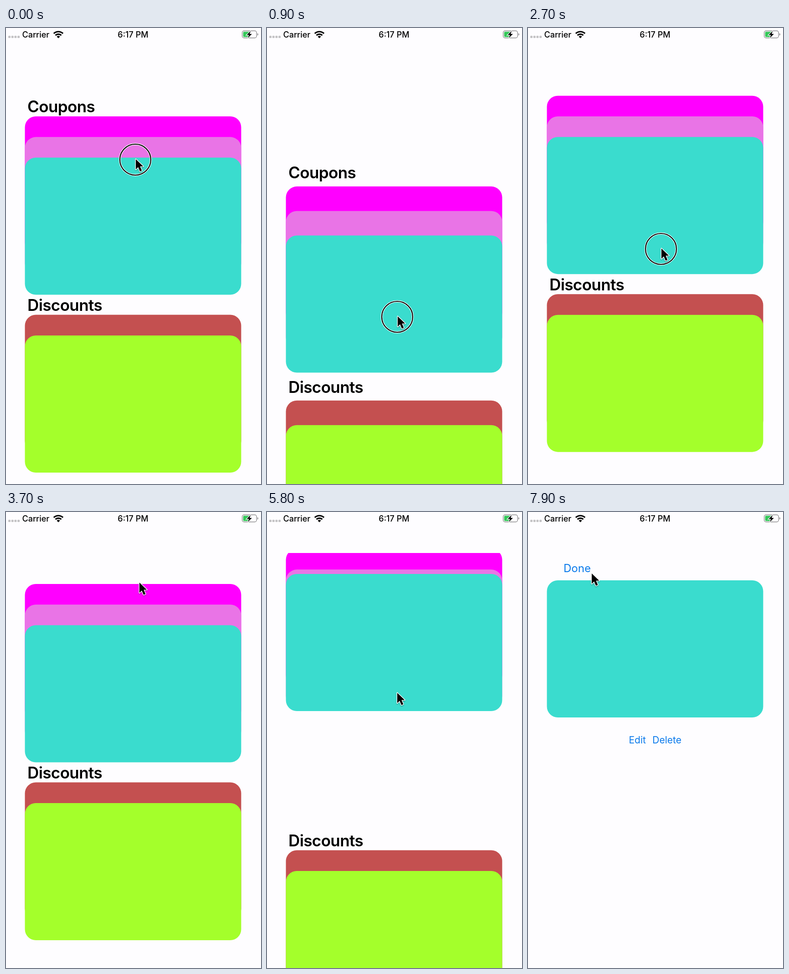
Recreate the animation shown at these times as an HTML page. Size 560 by 1001 pixels, loop 8 s.

```html
<!DOCTYPE html>
<html lang="en">
<head>
<meta charset="utf-8">
<title>Card stacks</title>
<style>
html, body { margin: 0; width: 100%; height: 100%; overflow: hidden; background: #fefdff; }
svg { display: block; width: 560px; height: 1001px; font-family: Inter, Roboto, sans-serif; font-optical-sizing: none; }
.title { font-size: 35px; font-weight: 600; letter-spacing: -.6px; }
.status { font-size: 18px; font-weight: 500; }
.link { fill: #0a7aeb; font-size: 21px; }
</style>
</head>
<body>
<svg viewBox="0 0 560 1001">
  <defs>
    <clipPath id="view"><rect y="90" width="560" height="911"/></clipPath>
    <filter id="soft" x="-50%" y="-50%" width="200%" height="200%">
      <feDropShadow dx="0" dy="1.5" stdDeviation="1.2" flood-opacity=".35"/>
    </filter>
  </defs>
  <rect width="560" height="1001" fill="#fefdff"/>

  <g id="list" clip-path="url(#view)"></g>

  <g id="actions">
    <text class="link" x="78" y="132" style="font-size:24px">Done</text>
    <text class="link" x="221.5" y="508">Edit</text>
    <text class="link" x="273.3" y="508">Delete</text>
  </g>

  <g class="status">
    <g fill="#c4c3c5">
      <rect x="5" y="17" width="5" height="5" rx="1.5"/>
      <rect x="11.7" y="17" width="5" height="5" rx="1.5"/>
      <rect x="18.4" y="17" width="5" height="5" rx="1.5"/>
      <rect x="25.1" y="17" width="5" height="5" rx="1.5"/>
    </g>
    <text x="35.5" y="20.5">Carrier</text>
    <g fill="none" stroke="#000" stroke-width="3.2">
      <path d="M104.9 12.2a14.3 14.3 0 0 1 20.2 0"/>
      <path d="M108.6 16.2a9 9 0 0 1 12.8 0"/>
    </g>
    <path d="M115 22.5l-3.7-3.8a5.2 5.2 0 0 1 7.4 0z"/>
    <text x="279" y="20.5" text-anchor="middle">6:17 PM</text>
    <rect x="518.7" y="6.2" width="31.6" height="15.6" rx="4" fill="none" stroke="#8f8e90" stroke-width="1.4"/>
    <path d="M552 11.2q2 .8 2 2.8t-2 2.8z" fill="#8f8e90"/>
    <rect x="520.8" y="8.3" width="15.2" height="11.4" rx="2" fill="#35c759"/>
    <path d="M537.5 6.5l-9 8.8h5l-2.5 6.7 9-9h-5z" stroke="#fefdff" stroke-width="2.4" paint-order="stroke"/>
  </g>

  <g id="pointer">
    <g id="ring" fill="none">
      <circle cx="-1" cy="1" r="34" stroke="#fff" stroke-width="4.4"/>
      <circle cx="-1" cy="1" r="34" stroke="#000" stroke-width="2.2"/>
    </g>
    <path d="M0 0v22.5l5.2-5 4 9.2 4.2-1.8-4-9.1h7z" stroke="#fff" stroke-width="2.6"
      paint-order="stroke" stroke-linejoin="round" filter="url(#soft)"/>
  </g>
</svg>
<script>
const LOOP = 8000, STEP = 100;
const byId = id => document.getElementById(id);
const list = byId('list'), actions = byId('actions'), pointer = byId('pointer'), ring = byId('ring');

function add(tag, attrs, text = '') {
  const node = document.createElementNS('http://www.w3.org/2000/svg', tag);
  for (const key in attrs) node.setAttribute(key, attrs[key]);
  node.textContent = text;
  list.append(node);
  return node;
}
const title = (y, text) => ({ y, node: add('text', { class: 'title', x: 47 }, text) });
const card = (y, fill) => ({ y, node: add('rect', { x: 41.5, width: 475, height: 301, rx: 24, fill }) });

const items = [
  title(185, 'Coupons'),
  card(194, '#ff00ff'), card(239.3, '#e974e6'), card(284.5, '#3adcce'),
  title(621, 'Discounts'),
  card(629.5, '#c45050'), card(675, '#a4ff2b')
];
const HEADER = 0, CHOSEN = 3;

// time, x, y of the pointer tip
const path = [
  [0, 285, 288], [900, 287, 633], [1150, 293, 731], [1900, 293, 731],
  [2450, 293, 573], [2500, 293, 573], [2700, 293, 484], [3350, 293, 155],
  [4500, 293, 155], [5100, 286, 397], [6300, 286, 397], [7500, 140, 135], [LOOP, 140, 135]
];
const drags = [{ from: 0, to: 1160 }, { from: 2500, to: 3434 }];
const tap = { from: 5300, to: 5500 };

const clamp = v => Math.min(1, Math.max(0, v));
const span = (t, a, b) => clamp((t - a) / (b - a));
const smooth = p => p * p * (3 - 2 * p);
const within = (t, { from, to }) => t >= from && t < to;

function tipAt(t) {
  const i = path.findIndex(k => k[0] > t);
  const [t0, x0, y0] = path[i - 1], [t1, x1, y1] = path[i];
  const p = (t - t0) / (t1 - t0);
  return [x0 + (x1 - x0) * p, y0 + (y1 - y0) * p];
}

// Overscroll resistance while held, critically damped return after release
function rubber(d) {
  const pull = Math.abs(d) * .55;
  return Math.sign(d) * pull * 620 / (pull + 620);
}
function scrollAt(t) {
  const drag = drags.findLast(d => t >= d.from);
  const end = Math.min(t, drag.to);
  const z = (t - end) * .0109;
  return rubber(tipAt(end)[1] - tipAt(drag.from)[1]) * (1 + z) * Math.exp(-z);
}

function draw(t) {
  const scroll = scrollAt(t);
  const spread = Math.max(0, scroll) * .059;
  const away = 452 * span(t, 5500, 6100) ** 2;
  const lift = -148.5 * smooth(span(t, 5500, 5800)) + 14 * smooth(span(t, 5800, 6100));

  items.forEach(({ y, node }, i) => {
    const leave = i === CHOSEN ? lift : i < CHOSEN ? -away : away;
    node.setAttribute('y', y + scroll + spread * i + leave);
    const hidden = i !== CHOSEN && t >= 6100 || i === HEADER && scroll < -12;
    node.style.display = hidden ? 'none' : '';
  });

  actions.style.opacity = span(t, 6000, 6300);
  pointer.setAttribute('transform', `translate(${tipAt(t)})`);
  ring.style.display = [...drags, tap].some(d => within(t, d)) ? '' : 'none';
}

const start = performance.now();
function tick() {
  const t = (performance.now() - start) % LOOP;
  draw(Math.floor(t / STEP) * STEP);
  requestAnimationFrame(tick);
}
tick();
</script>
</body>
</html>
```
